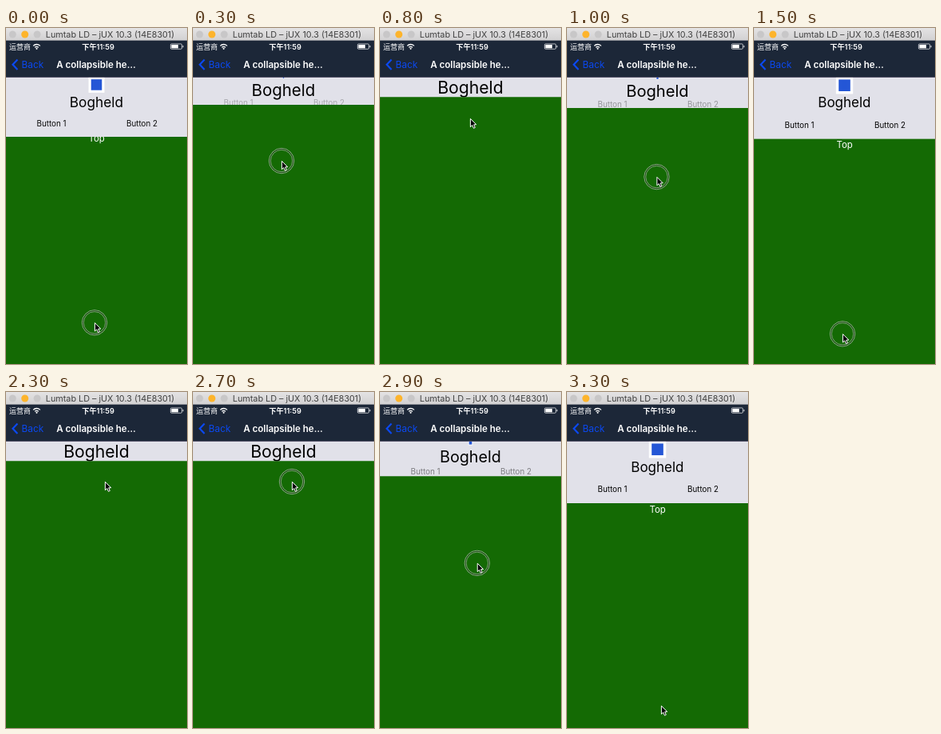
These frames come from a looping animation (227x420 px, 3400 ms). An HTML page with a canvas:

```html
<!DOCTYPE html>
<html lang="en">
<head>
<meta charset="utf-8">
<title>Collapsible header</title>
<style>
html, body { margin: 0; width: 100%; height: 100%; overflow: hidden; }
canvas { display: block; width: 227px; height: 420px; }
</style>
</head>
<body>
<canvas id="stage"></canvas>
<script>
const W = 227, H = 420, LOOP = 3400, STEP = 100;
const NAV_END = 61, OPEN = 139, RANGE = 52.5;
const REST_Y = 383, FOLD_RATE = 0.198;
const SANS = 'Inter, sans-serif', CJK = '"Noto Sans CJK SC", "Noto Sans CJK", sans-serif';
const BLUE = '#0b49f2';

const canvas = document.getElementById('stage');
const ctx = canvas.getContext('2d');
const ratio = window.devicePixelRatio || 1;
canvas.width = W * ratio;
canvas.height = H * ratio;
ctx.scale(ratio, ratio);

// ends of each swipe, eased in between
const swipes = [
  { t: -80, x: 111, y: 385 },
  { t: 450, x: 111, y: 113 },
  { t: 820, x: 113, y: 113 },
  { t: 1350, x: 111, y: 386 },
  { t: 1490, x: 111, y: 383 },
  { t: 1810, x: 121, y: 139 },
  { t: 2300, x: 124, y: 112 },
  { t: 2700, x: 124, y: 112 },
  { t: 3190, x: 118, y: 392 }
];
const touches = [[0, 600], [900, 2100], [2600, 3200]];

const clamp = (v, lo, hi) => Math.max(lo, Math.min(hi, v));
const mix = (a, b, k) => a + (b - a) * k;
const ease = u => u * u * (3 - 2 * u);

function pointerAt(t) {
  const next = swipes.findIndex(s => s.t > t);
  if (next < 0) return swipes[swipes.length - 1];
  const a = swipes[next - 1], b = swipes[next];
  const k = ease((t - a.t) / (b.t - a.t));
  return { x: mix(a.x, b.x, k), y: mix(a.y, b.y, k) };
}

function rect(color, x, y, w, h) {
  ctx.fillStyle = color;
  ctx.fillRect(x, y, w, h);
}

function text(str, x, y, size, color, { weight = 400, align = 'center', family = SANS } = {}) {
  ctx.font = `${weight} ${size}px ${family}`;
  ctx.textAlign = align;
  ctx.fillStyle = color;
  ctx.fillText(str, x, y);
}

function disc(color, x, y, r) {
  ctx.fillStyle = color;
  ctx.beginPath();
  ctx.arc(x, y, r, 0, Math.PI * 2);
  ctx.fill();
}

function arc(color, width, x, y, r, from = 0, to = Math.PI * 2) {
  ctx.strokeStyle = color;
  ctx.lineWidth = width;
  ctx.beginPath();
  ctx.arc(x, y, r, from, to);
  ctx.stroke();
}

function drawWindowBar() {
  const g = ctx.createLinearGradient(0, 0, 0, 16);
  g.addColorStop(0, '#e4e3e4');
  g.addColorStop(1, '#d1d0d1');
  rect(g, 0, 0, W, 15.6);
  ['#c8c7c8', '#fdb42c', '#c8c7c8'].forEach((color, i) => disc(color, 8.3 + i * 15.4, 8, 4.5));
  text('Lumtab LD – jUX 10.3 (14E8301)', 130.5, 11.7, 10.8, '#414141');
}

function drawNav() {
  rect('#1c2738', 0, 15, W, NAV_END - 15);
  rect('rgba(16,14,40,0.85)', 0, NAV_END, W, 0.8);
  text('运营商', 4, 26.5, 9, '#fff', { align: 'left', family: CJK });
  for (const r of [3.2, 6]) arc('#fff', 1.3, 38.5, 26.5, r, -Math.PI * 0.76, -Math.PI * 0.24);
  disc('#fff', 38.5, 25.8, 1.1);
  text('下午11:59', 115.5, 26.7, 9.2, '#fff', { weight: 600, family: 'Inter, ' + CJK });

  ctx.strokeStyle = '#d8dade';
  ctx.lineWidth = 0.8;
  ctx.beginPath();
  ctx.roundRect(206.4, 19.9, 14.2, 6.4, 1.2);
  ctx.stroke();
  rect('#fff', 207.4, 20.9, 8.6, 4.4);
  rect('#d8dade', 221.4, 21.9, 1.1, 2.4);

  ctx.strokeStyle = BLUE;
  ctx.lineWidth = 2.2;
  ctx.beginPath();
  ctx.moveTo(14.4, 39.6);
  ctx.lineTo(8.5, 45.8);
  ctx.lineTo(14.4, 52);
  ctx.stroke();
  text('Back', 19.6, 50.2, 11.8, BLUE, { align: 'left' });
  text('A collapsible he…', 113, 50.2, 11.6, '#fff', { weight: 600 });
}

function drawHeader(fold) {
  const k = fold / RANGE;
  const height = OPEN - fold - NAV_END;
  ctx.save();
  ctx.beginPath();
  ctx.rect(0, NAV_END, W, height);
  ctx.clip();
  rect('#e1e1e9', 0, NAV_END, W, height);

  const tile = 21.5 * Math.pow(1 - k, 1.35);
  rect('#fff', 113.5 - tile / 2, NAV_END, tile, tile);
  rect('#2456d6', 113.5 - tile * 0.34, NAV_END + tile * 0.16, tile * 0.68, tile * 0.68);

  ctx.globalAlpha = Math.pow(1 - k, 0.8);
  const baseline = 124.7 - fold * 0.65;
  text('Button 1', 57, baseline, 9.8, '#000');
  text('Button 2', 170.5, baseline, 9.8, '#000');
  ctx.globalAlpha = 1;

  text('Bogheld', 113.4, 99.5 - 18 * k, mix(17, 21.2, k), '#000');
  ctx.restore();
}

function drawPointer(x, y, pressed) {
  if (pressed) {
    arc('rgba(205,205,205,0.65)', 1, x, y, 15.7);
    arc('rgba(40,50,40,0.55)', 1, x, y, 14.7);
    arc('rgba(205,205,205,0.55)', 1, x, y, 13.7);
  }
  const shape = [[0, 0], [0, 10.4], [2.4, 8.2], [4, 12], [5.9, 11.2], [4.3, 7.5], [7.4, 7.4]];
  ctx.beginPath();
  for (const [dx, dy] of shape) ctx.lineTo(x + 0.4 + dx, y + 0.3 + dy);
  ctx.closePath();
  ctx.fillStyle = '#000';
  ctx.fill();
  ctx.strokeStyle = '#fff';
  ctx.lineWidth = 1;
  ctx.stroke();
}

function draw(t) {
  const { x, y } = pointerAt(t);
  const fold = clamp((REST_Y - y) * FOLD_RATE, 0, RANGE);
  rect('#146a04', 0, NAV_END, W, H - NAV_END);
  text('Top', 113.7, 150.6 - fold * 3, 11.4, '#fff');
  drawHeader(fold);
  drawNav();
  drawWindowBar();
  drawPointer(x, y, touches.some(([a, b]) => t >= a && t <= b));
}

const start = performance.now();
function tick() {
  const t = Math.max(0, performance.now() - start) % LOOP;
  draw(Math.floor(t / STEP) * STEP);
  requestAnimationFrame(tick);
}
tick();
</script>
</body>
</html>
```
